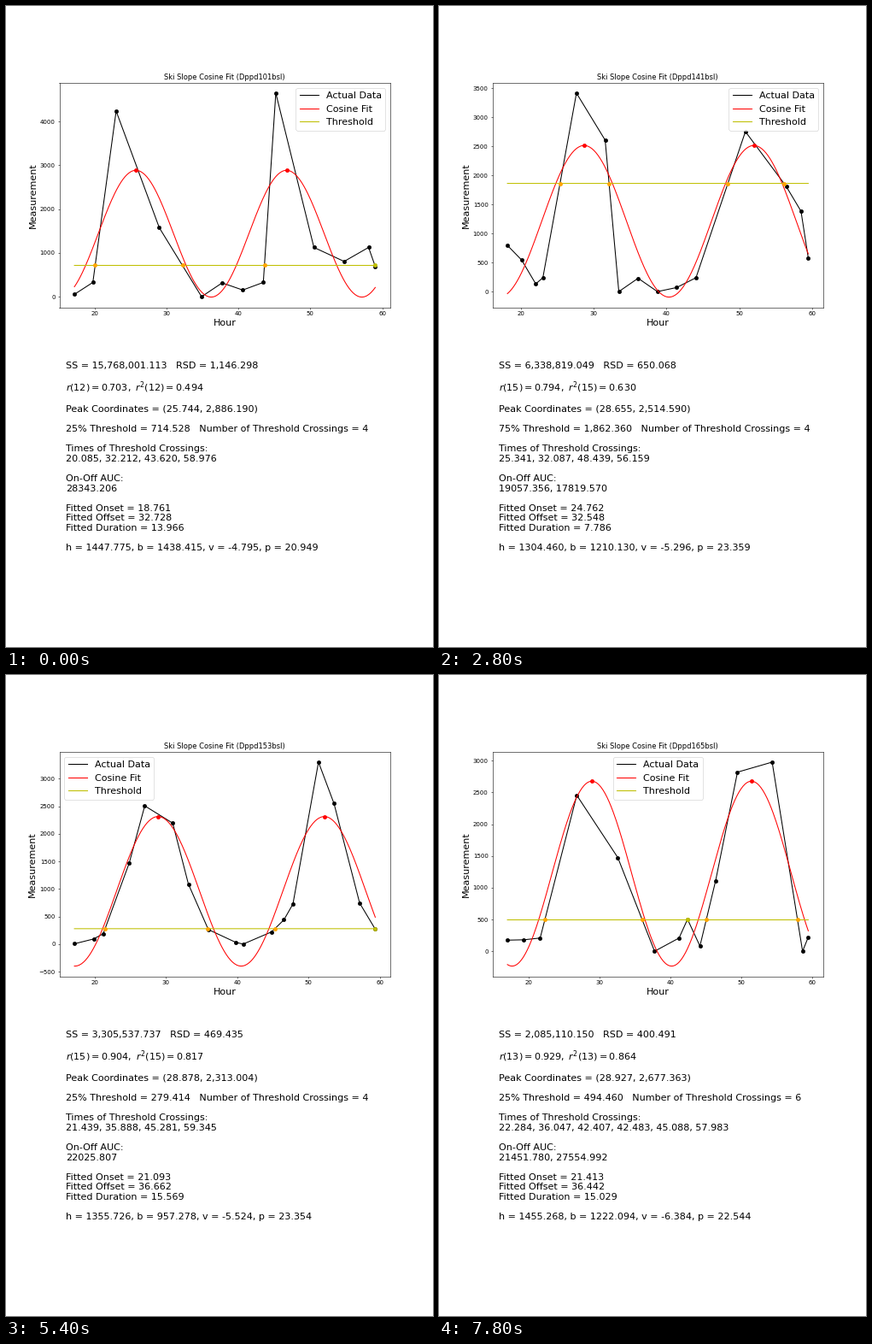
Recreate the animation shown at these times as a matplotlib script. Size 500 px wide and 750 px high, loop 8 s.

```python
import numpy as np
import matplotlib.pyplot as plt
from matplotlib.animation import FuncAnimation

LEVELS = (25, 50, 75)
FRAMES = 40
subjects = []


def wave(t, fit):
    """b + h cos(2 pi (t + v) / p)"""
    h, b, v, p = fit
    return b + h * np.cos(2 * np.pi * (t + v) / p)


def threshold(fit, percent):
    h, b, _, _ = fit
    return b + h * (percent / 50 - 1)


def add(code, x, y, fit, ss, r2, df, loc="best"):
    subjects.append(dict(code=code, x=x, y=y, fit=fit, ss=ss, r2=r2, df=df, loc=loc))


def trace(path, level, spacing, rng):
    """Turn vertices and crossing times into samples.

    A bare number is a time at which the line through the neighbouring high
    vertex meets the level; that line is carried on down to a foot. Long
    stretches between low points are filled with slightly noisy samples.
    """
    top = max(p[1] for p in path if isinstance(p, tuple))
    points = []
    for k, item in enumerate(path):
        if isinstance(item, tuple):
            points.append(item)
            continue
        before = path[k - 1]
        falling = isinstance(before, tuple) and before[1] > level
        x, y = before if falling else path[k + 1]
        foot = 0 if falling else 0.07 * top
        points.append((item + (x - item) * (foot - level) / (y - level), foot))

    samples = points[:1]
    for (x0, y0), (x1, y1) in zip(points, points[1:]):
        quiet = max(y0, y1) < level
        steps = max(1, round((x1 - x0) / spacing)) if quiet else 1
        for u in np.arange(1, steps) / steps:
            noise = rng.uniform(-0.05, 0.05) * top
            samples.append((x0 + u * (x1 - x0), max(0, y0 + u * (y1 - y0) + noise)))
        samples.append((x1, y1))
    return np.array(samples).T


def measured(code, path, fit, percent, ss, r2, df, loc):
    rng = np.random.default_rng(int(code[:3]))
    spacing = (path[-1][0] - path[0][0]) / (df + 1)
    x, y = trace(path, threshold(fit, percent), spacing, rng)
    add(code, x, y, fit, ss, r2, df, loc)


def fit_cosine(x, y):
    best = None
    for p in np.arange(20, 26, 0.013):
        w = 2 * np.pi * x / p
        basis = np.column_stack([np.ones_like(x), np.cos(w), np.sin(w)])
        coef = np.linalg.lstsq(basis, y, rcond=None)[0]
        ss = np.sum((basis @ coef - y) ** 2)
        if best is None or ss < best[0]:
            best = ss, p, coef
    ss, p, (b, c, s) = best
    phase = np.arctan2(s, c) * p / (2 * np.pi) % p
    return (np.hypot(c, s), b, -phase, p), ss


def simulated(code, top, sharp=1.7):
    rng = np.random.default_rng(int(code[:3]))
    gaps = rng.uniform(0.4, 1.6, rng.integers(14, 18))
    start, end = rng.uniform(17, 18.5), rng.uniform(58.5, 59.5)
    x = start + (end - start) * np.append(0, np.cumsum(gaps) / gaps.sum())
    peak, period = rng.uniform(27, 29), rng.uniform(22, 24)
    y = np.exp(sharp * (np.cos(2 * np.pi * (x - peak) / period) - 1))
    y *= rng.uniform(0.75, 1.15, len(x))
    y -= y.min()
    y *= top / y.max()
    fit, ss = fit_cosine(x, y)
    add(code, x, y, fit, ss, 1 - ss / np.sum((y - y.mean()) ** 2), len(x) - 2)


measured("101bsl",
         [(17.2, 53), 20.085, (23, 4240), (29, 1575), 32.212, 43.62,
          (45.2, 4650), (50.5, 1125), (54.7, 805), (58.1, 1125), (59.028, 690)],
         (1447.7748, 1438.4153, -4.795, 20.9494), 25,
         15768001.113, 0.494, 12, "upper right")
simulated("101ptx", 860)
measured("131bsl",
         [(18.65, 664), 21.383, (23.5, 1881), (30.094, 378), (40.1, 0),
          (49, 400), (60.2, 0)],
         (603.501, 477.4732, -2.7, 21.606), 75,
         1458095.678, 0.474, 7, "upper right")
simulated("131ptx", 900)
measured("141bsl",
         [(18.1, 795), (22, 133), 25.341, (27.6, 3416), (31.55, 2607), 32.087,
          48.439, (50.85, 2754), (56.465, 1811), (58.5, 1384), (59.5, 582)],
         (1304.46, 1210.13, -5.296, 23.359), 75,
         6338819.049, 0.630, 15, "upper right")
simulated("141ptx", 4300)
simulated("148bsl", 7000, 3.5)
measured("148ptx",
         [(19.5, 241), 25.177, (28.8, 3667), (31, 2690), 32.194, 50.444,
          (53.3, 3431), (56.1, 1983), (58.534, 620)],
         (1489.094, 1041.895, -4.9597, 23.9889), 75,
         5488876.652, 0.760, 17, "lower right")
simulated("149ptx", 7000, 3.5)
simulated("153bsl", 3300)
measured("153ptx",
         [(9.5, 265), 21.291, (25.9, 1421), (30.65, 1553), 34.617, 44.171,
          (45.9, 796), (49.3, 887), (53.5, 1807), (55.5, 1076)],
         (683.168, 738.356, -2.3514, 25.2894), 25,
         959737.240, 0.821, 16, "upper left")
simulated("164bsl", 3800)
measured("164ptx",
         [(17.7, 181), 22.982, (24.1, 1861), (33.6, 3483), (34.9, 1365),
          (35.65, 2280), 37.421, 45.451, (47.2, 2595), (51.2, 3397),
          (56.1, 3158), (58.9, 4553), (59.6, 1536)],
         (1747.168, 1873.056, -5.9404, 24.1442), 25,
         10183154.961, 0.699, 15, "upper left")
measured("165bsl",
         [(17, 175), 22.284, (26.8, 2456), (32.6, 1474), 36.047, 42.407,
          (42.4445, 503.7), (44.2, 82), (46.413, 1110), (49.5, 2820),
          (54.4, 2978), 57.983, (59.5, 222)],
         (1455.2683, 1222.0943, -6.3837, 22.5436), 25,
         2085110.150, 0.8636, 13, "upper center")


def find_crossings(x, y, level):
    times, rising = [], []
    for x0, x1, y0, y1 in zip(x, x[1:], y, y[1:]):
        if (y0 < level) != (y1 < level):
            times.append(x0 + (x1 - x0) * (level - y0) / (y1 - y0))
            rising.append(y1 > y0)
    return times, rising


def area(x, y, on, off):
    t = np.concatenate([[on], x[(x > on) & (x < off)], [off]])
    f = np.interp(t, x, y)
    return np.sum(np.diff(t) * (f[1:] + f[:-1]) / 2)


def pair_up(x, y, times, rising):
    """Areas of the valid on-off spans and the indices of rejected crossings."""
    areas, stray = [], set()
    for i in range(len(times) - 1):
        if not rising[i]:
            continue
        on, off = times[i], times[i + 1]
        if off - on < 1:
            stray |= {i, i + 1}
        elif off > x[-1] - 0.2:
            stray.add(i + 1)
        else:
            areas.append(area(x, y, on, off))
    return areas, stray


def listing(values):
    return ", ".join(f"{v:.3f}" for v in values)


def summary(s, percent, level, times, areas):
    """The two lines of fit quality and the block below them."""
    h, b, v, p = s["fit"]
    df, r2 = s["df"], s["r2"]
    half = p * np.arccos(percent / 50 - 1) / (2 * np.pi)
    peak = p - v
    return (
        f"SS = {s['ss']:,.3f}   RSD = {np.sqrt(s['ss'] / df):,.3f}",
        rf"$r({df}) = {np.sqrt(r2):.3f},\ r^2({df}) = {r2:.3f}$",
        "\n".join([
            f"Peak Coordinates = ({peak:.3f}, {h + b:,.3f})", "",
            f"{percent}% Threshold = {level:,.3f}   "
            f"Number of Threshold Crossings = {len(times)}", "",
            "Times of Threshold Crossings:", listing(times), "",
            "On-Off AUC:", listing(areas), "",
            f"Fitted Onset = {peak - half:.3f}",
            f"Fitted Offset = {peak + half:.3f}",
            f"Fitted Duration = {2 * half:.3f}", "",
            f"h = {h:.3f}, b = {b:.3f}, v = {v:.3f}, p = {p:.3f}"]))


fig = plt.figure(figsize=(10, 15), dpi=50, facecolor="white")
ax = fig.add_axes([0.125, 0.53, 0.775, 0.35])
notes = [fig.text(0.1405, y / 750, "", fontsize=16, va=va)
         for y, va in ((326, "baseline"), (300, "baseline"), (110.8, "bottom"))]


def draw(i):
    s, percent = subjects[i // 3], LEVELS[i % 3]
    x, y, fit = s["x"], s["y"], s["fit"]
    h, b, v, p = fit
    level = threshold(fit, percent)
    times, rising = find_crossings(x, y, level)
    areas, stray = pair_up(x, y, times, rising)

    ax.clear()
    t = np.linspace(x[0], x[-1], 300)
    ax.plot(x, y, "k-", label="Actual Data")
    ax.plot(x, y, "ko")
    ax.plot(t, wave(t, fit), "r-", label="Cosine Fit")
    ax.plot([x[0], x[-1]], [level, level], "y-", label="Threshold", snap=False)
    peaks = [q for q in p * np.arange(4) - v if x[0] <= q <= x[-1]]
    ax.plot(peaks, [h + b] * len(peaks), "ro")
    for k, time in enumerate(times):
        ax.plot(time, level, "o", color="y" if k in stray else "orange")

    ax.set_title(f"Ski Slope Cosine Fit (Dppd{s['code']})")
    ax.set_xlabel("Hour", fontsize=16)
    ax.set_ylabel("Measurement", fontsize=16)
    ax.legend(fontsize=16, loc=s["loc"])
    for note, text in zip(notes, summary(s, percent, level, times, areas)):
        note.set_text(text)
    return []


anim = FuncAnimation(fig, draw, frames=FRAMES, interval=200,
                     init_func=lambda: draw(0), repeat=True, repeat_delay=0)
plt.show()
```
